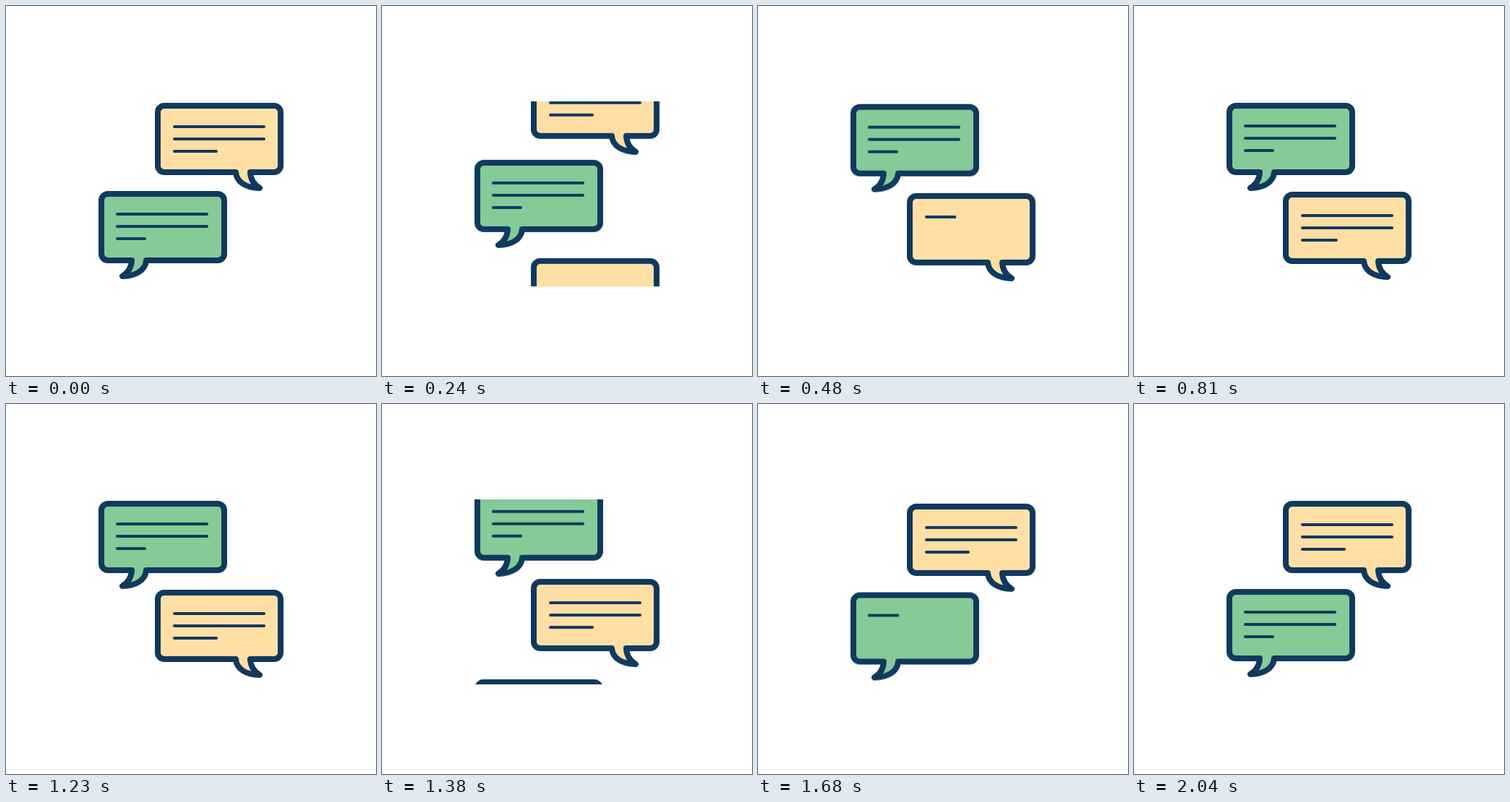
Write an HTML page that moves like this. It is 512 px wide and 512 px high and loops after 2.43 s.

```html
<!DOCTYPE html>
<html lang="en">
<head>
<meta charset="utf-8">
<title>Chat bubbles</title>
<style>
  html, body { margin: 0; width: 100%; height: 100%; overflow: hidden; background: #fff; }
  svg { display: block; width: 100vw; height: 100vh; }

  .bubble {
    stroke: #10395f;
    stroke-linecap: round;
    stroke-linejoin: round;
    --glide: cubic-bezier(.57, 0, .49, 1);
    animation: 2430ms var(--glide) infinite both;
  }
  .yellow { fill: #ffdfa4; }
  .green { fill: #86ca98; }
  .shape { stroke-width: 8; }
  .text { stroke-width: 4; fill: none; }

  #yellow-old { animation-name: yellow-old; }
  #green-old { animation-name: green-old; }
  #yellow-new { animation-name: yellow-new; }
  #green-new { animation-name: green-new; }

  /* scroll one: 0-533 ms, scroll two: 1225-1758 ms */
  @keyframes yellow-old {
    0% { transform: translateY(134px); }
    21.934%, 100% { transform: translateY(-8px); }
  }
  @keyframes green-old {
    0% { transform: translateY(256px); }
    21.934%, 50.412% { transform: translateY(134px); }
    72.346%, 100% { transform: translateY(-8px); }
  }
  @keyframes yellow-new {
    0% { transform: translateY(399px); }
    21.934%, 50.412% { transform: translateY(257px); }
    72.346%, 100% { transform: translateY(134px); }
  }
  @keyframes green-new {
    0%, 50.412% { transform: translateY(398px); }
    72.346%, 100% { transform: translateY(256px); }
  }

  /* each text line is written in 133 ms, one after another */
  .typed path {
    stroke-dasharray: 1 2;
    animation: 2430ms linear infinite both;
  }
  .typed path:nth-child(1) { animation-name: type-1; }
  .typed path:nth-child(2) { animation-name: type-2; }
  .typed path:nth-child(3) { animation-name: type-3; }
  .green .typed path { animation-delay: 1200ms; }

  @keyframes type-1 {
    0%, 17.984% { stroke-dashoffset: 1.02; }
    23.457%, 100% { stroke-dashoffset: 0; }
  }
  @keyframes type-2 {
    0%, 23.457% { stroke-dashoffset: 1.02; }
    28.93%, 100% { stroke-dashoffset: 0; }
  }
  @keyframes type-3 {
    0%, 28.93% { stroke-dashoffset: 1.02; }
    34.403%, 100% { stroke-dashoffset: 0; }
  }
</style>
</head>
<body>
<svg viewBox="0 0 512 512">
  <defs>
    <clipPath id="window"><rect x="128" y="132" width="256" height="256"/></clipPath>
    <path id="right" d="M219 4H371a9 9 0 0 1 9 9V87a9 9 0 0 1-9 9H338c.5 9.500 5 17 13 22C333 118 319 110 318 96H219a9 9 0 0 1-9-9V13a9 9 0 0 1 9-9Z"/>
    <use id="left" href="#right" transform="matrix(-1 0 0 1 512 0)"/>
  </defs>
  <g clip-path="url(#window)">
    <g id="yellow-old" class="bubble yellow">
      <use class="shape" href="#right"/>
      <path class="text" d="M233 33H357M233 50H357M233 67H291"/>
    </g>
    <g id="green-old" class="bubble green">
      <use class="shape" href="#left"/>
      <path class="text" d="M154 32H278M154 49H278M154 66H192"/>
    </g>
    <g id="yellow-new" class="bubble yellow">
      <use class="shape" href="#right"/>
      <g class="text typed">
        <path pathLength="1" d="M233 33H357"/>
        <path pathLength="1" d="M233 50H357"/>
        <path pathLength="1" d="M233 67H291"/>
      </g>
    </g>
    <g id="green-new" class="bubble green">
      <use class="shape" href="#left"/>
      <g class="text typed">
        <path pathLength="1" d="M154 32H278"/>
        <path pathLength="1" d="M154 49H278"/>
        <path pathLength="1" d="M154 66H192"/>
      </g>
    </g>
  </g>
</svg>
</body>
</html>
```
